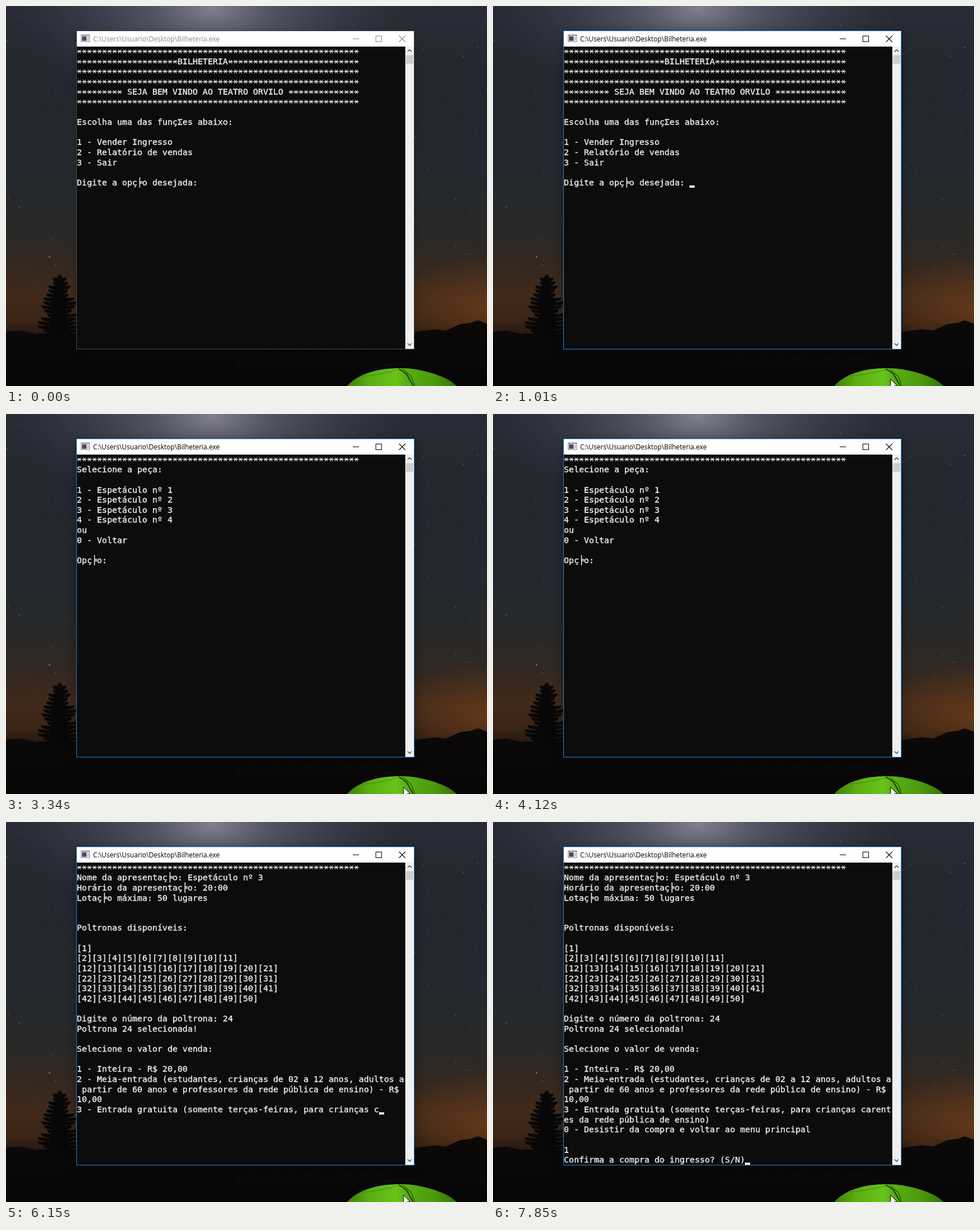
These frames come from a looping animation (842 by 665 pixels, 8000 ms). An HTML page with a canvas:

```html
<!DOCTYPE html>
<html lang="pt">
<head>
<meta charset="utf-8">
<title>Bilheteria</title>
<style>
html, body { margin: 0; width: 842px; height: 665px; overflow: hidden; background: #000; }
canvas { display: block; }
</style>
</head>
<body>
<canvas id="stage" width="842" height="665"></canvas>
<script>
const W = 842, H = 665, LOOP = 8000;
const LEFT = 124, TOP = 71, COL = 8.82, ROW = 17.64, TEXT = '#ececec';
const ctx = document.getElementById('stage').getContext('2d');

// ---- Console text ----
const stars = n => '*'.repeat(n);
const rule = stars(56) + '\n';
const seats = (a, b) => {
  let s = '';
  for (let i = a; i <= b; i++) s += `[${i}]`;
  return s + '\n';
};

const menu = rule + stars(20) + 'BILHETERIA' + stars(26) + '\n' + rule + rule +
  stars(9) + ' SEJA BEM VINDO AO TEATRO ORVILO ' + stars(14) + '\n' + rule + `
Escolha uma das funçΣes abaixo:

1 - Vender Ingresso
2 - Relatório de vendas
3 - Sair

Digite a opç╞o desejada: `;

const sell = rule + `1 - Peças e horários
0 - Voltar
--> `;

const shows = rule + 'Selecione a peça:\n\n' +
  [1, 2, 3, 4].map(n => `${n} - Espetáculo nº ${n}\n`).join('') + `ou
0 - Voltar

Opç╞o: `;

const hall = rule + `Nome da apresentaç╞o: Espetáculo nº 3
Horário da apresentaç╞o: 20:00
Lotaç╞o máxima: 50 lugares


Poltronas disponíveis:

` + seats(1, 1) + seats(2, 11) + seats(12, 21) + seats(22, 31) + seats(32, 41) + seats(42, 50) +
  '\nDigite o número da poltrona: ';

const pricesStart = hall + `24
Poltrona 24 selecionada!

Selecione o valor de venda:

1 - Inteira - R$ 20,00
2 - Meia-entrada (estudantes, crianças de 02 a 12 anos, adultos a
 partir de 60 anos e professores da rede pública de ensino) - R$
10,00
3 - Entrada gratuita (somente terças-feiras, para crianças c`;

const prices = pricesStart + `arent
es da rede pública de ensino)
0 - Desistir da compra e voltar ao menu principal

`;

// time, text, caret visible
const steps = [
  [0, menu, 0], [300, menu, 1], [480, menu, 0], [1010, menu, 1], [1540, menu, 0],
  [1690, menu + '1', 1], [1860, menu + '1\n', 1],
  [2010, sell, 1], [2550, sell, 0], [3100, sell + '1', 1],
  [3340, shows, 0], [3420, shows, 1], [4120, shows, 0],
  [4500, shows + '3', 1], [4670, shows + '3', 0], [4830, shows + '3\n', 1],
  [4990, hall, 1], [5750, hall + '2', 0], [5930, hall + '24', 1],
  [6150, pricesStart, 1], [6230, prices, 1], [6760, prices, 0], [7320, prices, 1],
  [7620, prices + '1', 1], [7850, prices + '1\nConfirma a compra do ingresso? (S/N)', 1]
];

// ---- Drawing helpers ----
function line(c, color, width, ...pts) {
  c.strokeStyle = color;
  c.lineWidth = width;
  c.beginPath();
  for (let i = 0; i < pts.length; i += 2) c.lineTo(pts[i], pts[i + 1]);
  c.stroke();
}

function shape(c, color, ...pts) {
  c.fillStyle = color;
  c.beginPath();
  for (let i = 0; i < pts.length; i += 2) c.lineTo(pts[i], pts[i + 1]);
  c.closePath();
  c.fill();
}

function box(c, color, x, y, w, h) {
  c.fillStyle = color;
  c.fillRect(x, y, w, h);
}

function fade(g, ...stops) {
  for (const [at, color] of stops) g.addColorStop(at, color);
  return g;
}

let seed = 7;
const rnd = () => (seed = seed * 16807 % 2147483647) / 2147483647;

// ---- Night landscape ----
function paintSky(c) {
  box(c, fade(c.createLinearGradient(0, 0, 0, 580),
    [0, '#292c36'], [.2, '#23272f'], [.5, '#23292f'], [.68, '#292827'],
    [.78, '#332820'], [.88, '#41291a'], [.95, '#3a2415'], [1, '#22160e']), 0, 0, W, H);

  c.save();
  c.scale(1, .5);
  box(c, fade(c.createRadialGradient(360, 10, 0, 360, 10, 350),
    [0, 'rgba(165,162,178,.7)'], [.3, 'rgba(120,120,138,.52)'], [1, 'rgba(65,68,85,0)']), 0, 0, W, 800);
  c.translate(842, 1060);
  c.scale(1, 1.1);
  box(c, fade(c.createRadialGradient(0, 0, 0, 0, 0, 170),
    [0, 'rgba(130,72,26,.5)'], [1, 'rgba(130,72,26,0)']), -200, -200, 200, 400);
  c.restore();

  // Dense star dust, a few brighter stars on top
  for (let i = 0; i < 6000; i++) {
    const y = 540 * rnd() ** 1.3;
    box(c, `rgba(190,195,210,${.16 * rnd()})`, Math.floor(rnd() * W), Math.floor(y), 1, 1);
  }
  for (let i = 0; i < 420; i++) {
    const x = rnd() * W, y = rnd() * 500, a = .1 + .45 * rnd() ** 4;
    line(c, `rgba(205,210,225,${a})`, 1, x, y, x + 1 + rnd() * 1.5, y + 1);
  }
  box(c, '#c89030', 75, 438, 2, 2);
}

function paintLand(c) {
  shape(c, '#0b0908', 0, 570, 25, 568, 50, 574, 90, 572, 130, 582, 400, 588, 690, 578, 725, 569,
    750, 566, 770, 568, 795, 557, 815, 554, 826, 550, W, 556, W, H, 0, H);
  box(c, fade(c.createLinearGradient(0, 570, 0, H),
    [0, 'rgba(6,5,5,0)'], [.5, '#080707'], [1, '#050506']), 0, 570, W, 95);
  for (let x = 400; x < W; x += 5) {
    const h = 10 + rnd() * 22;
    shape(c, 'rgba(28,18,13,.2)', x, 632, x + 3, 632 - h, x + 6, 632);
  }
}

function paintTree(c) {
  const ink = '#070707';
  shape(c, ink, 94, 468, 98, 480, 106, 590, 82, 590, 90, 480);
  for (let y = 476; y < 580; y += 7) {
    const w = 47 * Math.sqrt((y - 468) / 105);
    for (const side of [-1, 1]) {
      const r = side * w * (.55 + .45 * rnd());
      shape(c, ink, 94, y - 6, 94 + r * .5, y, 94 + r, y - 1, 94 + r * .9, y + 4, 94 + r * .6, y + 6, 94, y + 7);
    }
  }
}

function paintTent(c) {
  c.fillStyle = fade(c.createLinearGradient(597, 0, 787, 0),
    [0, '#3f7d08'], [.2, '#5aad12'], [.45, '#68c41a'], [.55, '#58ae12'], [.8, '#4c9a0d'], [1, '#387306']);
  c.beginPath();
  c.moveTo(597, 665);
  c.quadraticCurveTo(615, 645, 652, 637);
  c.quadraticCurveTo(690, 631, 718, 636);
  c.quadraticCurveTo(768, 645, 789, 665);
  c.fill();
  line(c, '#1d3f05', 2, 688, 635, 701, 644, 713, 665);
  line(c, 'rgba(30,65,5,.7)', 1.5, 694, 635, 709, 648, 716, 665);
  line(c, 'rgba(40,90,8,.5)', 1, 625, 648, 660, 643, 690, 636);
}

function paintScene() {
  const cv = document.createElement('canvas');
  cv.width = W;
  cv.height = H;
  const c = cv.getContext('2d');
  for (const paint of [paintSky, paintLand, paintTree, paintTent]) paint(c);
  return cv;
}

// ---- Window ----
function drawWindow(active) {
  const ink = active ? '#000' : '#8a8a8a';
  ctx.save();
  ctx.shadowColor = active ? 'rgba(0,0,0,.4)' : 'rgba(0,0,0,.25)';
  ctx.shadowBlur = active ? 16 : 8;
  ctx.shadowOffsetY = active ? 4 : 2;
  box(ctx, active ? '#2080d8' : '#494949', 123, 43, 592, 558);
  ctx.restore();
  box(ctx, '#fff', 124, 44, 590, 27);
  box(ctx, '#0c0c0c', 124, 71, 575, 529);

  box(ctx, '#8c8c94', 131, 50, 16, 13);
  box(ctx, '#f4f4f6', 132, 52, 14, 10);
  box(ctx, '#55486a', 133, 53, 8, 8);
  box(ctx, '#c5c5cc', 142, 53, 3, 8);

  ctx.fillStyle = ink;
  ctx.font = '11.75px "Open Sans", "Noto Sans", sans-serif';
  ctx.fillText('C:\\Users\\Usuario\\Desktop\\Bilheteria.exe', 152.5, 62);

  line(ctx, ink, 1, 607, 57.5, 618, 57.5);
  ctx.strokeRect(647.5, 52.5, 10, 10);
  line(ctx, ink, 1.1, 688, 52, 699, 63);
  line(ctx, ink, 1.1, 699, 52, 688, 63);

  box(ctx, '#f0f0f0', 699, 71, 15, 529);
  box(ctx, '#cdcdcd', 700, 86, 13, 15);
  line(ctx, '#505050', 1.5, 703, 80, 706.5, 76.5, 710, 80);
  line(ctx, '#505050', 1.5, 703, 590.5, 706.5, 594, 710, 590.5);
}

function drawAsterisk(x, y) {
  line(ctx, TEXT, 1.2, x + .4, y, x + 8.4, y);
  line(ctx, TEXT, 1.2, x + 2, y - 3, x + 6.8, y + 3);
  line(ctx, TEXT, 1.2, x + 6.8, y - 3, x + 2, y + 3);
}

function drawConsole(text, caret) {
  const rows = text.split('\n');
  ctx.font = '14.65px "DejaVu Sans Mono", monospace';
  rows.forEach((row, r) => {
    const y = TOP + r * ROW, plain = row.replace(/\*/g, ' ');
    const base = Math.round(y + 13.6);
    ctx.fillStyle = ctx.strokeStyle = TEXT;
    ctx.lineWidth = .4;
    ctx.fillText(plain, LEFT, base);
    ctx.strokeText(plain, LEFT, base);
    [...row].forEach((ch, i) => ch === '*' && drawAsterisk(LEFT + i * COL, Math.floor(y + 8.7) + .5));
  });
  if (caret) {
    const col = rows.at(-1).length;
    box(ctx, '#f2f2f2', Math.floor(LEFT + col * COL), Math.floor(TOP + rows.length * ROW + .2) - 4, 9, 4);
  }
}

// ---- Pointer: rises from below, clicks the window, goes back down ----
function drawPointer(t) {
  if (t < 70) return;
  const mix = (a, b, k) => a + (b - a) * k * k * (3 - 2 * k);
  const q = Math.min(Math.floor((t - 70) / 77) * 77 + 77, 940);
  const up = Math.min(q / 240, 1), down = Math.max(0, (q - 300) / 640);
  ctx.save();
  ctx.translate(mix(mix(650, 620, up), 696, down), mix(mix(675, 560, up), 653, down));
  shape(ctx, '#fff', 0, 0, 0, 16, 4, 12.5, 6.5, 18, 9, 17, 6.5, 11.5, 11.5, 11.5);
  ctx.strokeStyle = '#000';
  ctx.lineWidth = 1;
  ctx.stroke();
  ctx.restore();
}

const scene = paintScene();

function frame(now) {
  const t = now % LOOP;
  const [, text, caret] = steps.findLast(s => s[0] <= t);
  ctx.drawImage(scene, 0, 0);
  drawWindow(t >= 300);
  drawConsole(text, caret);
  drawPointer(t);
  requestAnimationFrame(frame);
}
frame(0);
</script>
</body>
</html>
```
